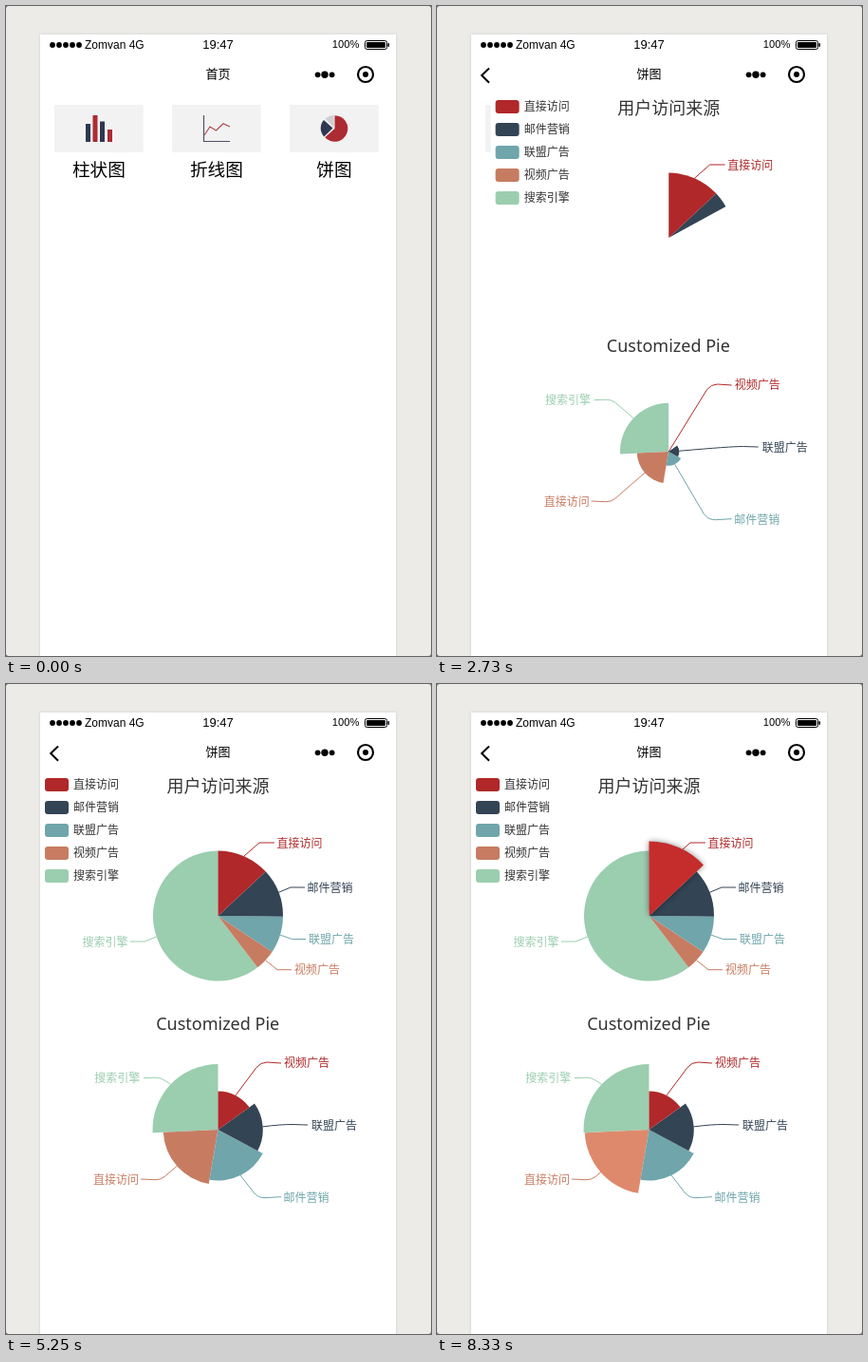
An HTML page that plays this animation: 448 by 684 pixels, repeating every 8400 ms.

```html
<!DOCTYPE html>
<html lang="zh-CN">
<head>
<meta charset="utf-8">
<title>饼图</title>
<style>
  html, body { margin: 0; width: 100%; height: 100%; overflow: hidden; background: #6c6c6a; }
  svg { display: block; width: 448px; height: 684px; }
  text { font-family: "Noto Sans CJK SC", "Noto Sans CJK JP", sans-serif; }
  .bar text { font-family: "Liberation Sans", Arial, sans-serif; }
  .mid { text-anchor: middle; }
  .end { text-anchor: end; }
  .card { font-size: 18.67px; }
  .nav { font-size: 13px; }
  .head { font-size: 18px; fill: #333; }
  .latin { font-family: "Noto Sans", sans-serif; }
  .key { font-size: 12px; fill: #333; }
  .label { font-size: 12px; font-weight: 500; }
  .line { fill: none; }
  .glow { filter: drop-shadow(0 0 3px rgba(0, 0, 0, .45)); }
</style>
</head>
<body>
<svg viewBox="0 0 448 684">
  <defs>
    <clipPath id="screen"><rect x="36" y="90" width="375" height="594"/></clipPath>
    <clipPath id="sweep"><path id="sweepPath"/></clipPath>
    <filter id="soft" x="-5%" y="-5%" width="110%" height="110%"><feGaussianBlur stdDeviation="1.6"/></filter>
  </defs>

  <rect width="448" height="684" rx="3" fill="#ecebe7"/>
  <rect x="36" y="30" width="375" height="670" fill="#c9ccd0" filter="url(#soft)"/>
  <rect x="36" y="30" width="375" height="654" fill="#fff"/>

  <g class="bar">
    <g id="signal"></g>
    <text x="83" y="44.5" font-size="12">Zomvan 4G</text>
    <text x="223.5" y="44.5" font-size="13" class="mid">19:47</text>
    <text x="343.8" y="44.3" font-size="11.2">100%</text>
    <rect x="378.5" y="36.5" width="23" height="9" rx="2" fill="none" stroke="#000"/>
    <rect x="380" y="38" width="20" height="6" rx="1"/>
    <rect x="402.5" y="39" width="1.5" height="4" rx=".7"/>
  </g>

  <text id="homeTitle" class="nav mid" x="223.5" y="76.2">首页</text>
  <g id="pieTitle">
    <text class="nav mid" x="223.5" y="76.2">饼图</text>
    <path d="M55 65.5L47.2 73L55 80.8" fill="none" stroke="#000" stroke-width="2"/>
  </g>
  <circle cx="328.6" cy="72.3" r="2.9"/>
  <circle cx="336" cy="72.3" r="3.7"/>
  <circle cx="343.6" cy="72.3" r="2.9"/>
  <circle cx="379" cy="72" r="8" fill="none" stroke="#000" stroke-width="2.2"/>
  <circle cx="379" cy="72" r="3"/>

  <g clip-path="url(#screen)">
    <g id="home"></g>
    <g id="page">
      <rect x="36" y="90" width="375" height="594" fill="#fff"/>
      <g id="charts">
        <text class="head mid" x="223.5" y="114.2">用户访问来源</text>
        <text class="head latin mid" x="223.2" y="364">Customized Pie</text>
        <g id="legend"></g>
        <g id="share" clip-path="url(#sweep)"></g>
        <g id="rose"></g>
      </g>
    </g>
  </g>
</svg>

<script>
const LOOP = 8400, STEP = 70;
const NAV = { at: 1700, ms: 470 };
const SLIDE = { at: 2510, ms: 310 };
const CHART = { at: 2672, ms: 960 };
const HOVER_MS = 300, HOVER_GROW = 10;
const COLORS = ['#b02829', '#334454', '#6fa5ab', '#c77c62', '#9bcdaf'];
const NAVY = '#2f3850', RED = '#ad2b33';

const $ = id => document.getElementById(id);
const clamp = v => Math.min(1, Math.max(0, v));
const phase = (t, s) => clamp((t - s.at) / s.ms);

function add(parent, tag, attrs, text) {
  const el = document.createElementNS(parent.namespaceURI, tag);
  for (const k in attrs) el.setAttribute(k, attrs[k]);
  if (text) el.textContent = text;
  return parent.appendChild(el);
}

// Angles are in degrees, clockwise from the top.
function polar(cx, cy, r, deg) {
  const a = deg * Math.PI / 180;
  return [cx + r * Math.sin(a), cy - r * Math.cos(a)];
}

function wedge(cx, cy, r, from, to) {
  if (r <= 0 || to <= from) return 'M0 0';
  to = Math.min(to, from + 359.99);
  const big = to - from > 180 ? 1 : 0;
  return `M${cx} ${cy}L${polar(cx, cy, r, from)}A${r} ${r} 0 ${big} 1 ${polar(cx, cy, r, to)}Z`;
}

const cubicOut = k => 1 - (1 - k) ** 3;

function elasticOut(k) {
  if (k <= 0) return 0;
  if (k >= 1) return 1;
  return 2 ** (-10 * k) * Math.sin((k - 0.1) * 2 * Math.PI / 0.4) + 1;
}

// cubic-bezier(.25, .1, .25, 1)
function ease(x) {
  let lo = 0, hi = 1;
  const at = (u, a, b) => 3 * u * (1 - u) ** 2 * a + 3 * u * u * (1 - u) * b + u ** 3;
  for (let i = 0; i < 24; i++) {
    const m = (lo + hi) / 2;
    if (at(m, 0.25, 0.25) < x) lo = m; else hi = m;
  }
  return at(lo, 0.1, 1);
}

function buildHome() {
  const home = $('home');
  ['柱状图', '折线图', '饼图'].forEach((name, i) => {
    const x = 51 + 124 * i;
    add(home, 'rect', { x, y: 104, width: 93.7, height: 50, fill: '#f2f2f2' });
    add(home, 'text', { class: 'card mid', x: x + 46.9, y: 179.3 }, name);
  });
  [[84, 124], [91.5, 115], [99, 121.5], [107, 130]].forEach(([x, y], i) =>
    add(home, 'rect', { x, y, width: 5, height: 143 - y, fill: i % 2 ? RED : NAVY }));
  add(home, 'path', { d: 'M208.5 115V142.5H236', class: 'line', stroke: '#4c5265', 'stroke-width': 1.2 });
  add(home, 'path', { d: 'M209 136L215 127L221.5 131L229 123.8L236 127', class: 'line', stroke: '#b04a50', 'stroke-width': 1.2 });
  add(home, 'path', { d: wedge(346.5, 129, 13.8, 0, 228), fill: RED });
  add(home, 'path', { d: wedge(344.5, 128.5, 12.8, 226, 312), fill: NAVY });
  add(home, 'path', { d: wedge(345.6, 127.7, 12.8, 315, 360), fill: '#cfcfd3' });
}

// Each label: name, x, y, anchor side, leader path after its first point.
function makePie(group, pie) {
  const total = pie.values.reduce((a, b) => a + b);
  let angle = 0;
  pie.items = pie.values.map((v, i) => {
    const from = angle, to = angle += v / total * 360;
    const [name, x, y, side, tail] = pie.labels[i];
    const line = add(group, 'path', { class: 'line', stroke: COLORS[i] });
    add(group, 'text', { class: 'label ' + side, x, y: y + 4.5, fill: COLORS[i] }, name);
    const r = pie.rose ? pie.r * v / Math.max(...pie.values) : pie.r;
    return { from, to, r, line, tail };
  });
  for (let i = pie.items.length - 1; i >= 0; i--)
    pie.items[i].shape = add(group, 'path', { fill: COLORS[i] });
}

function drawPie(pie, t) {
  const { cx, cy, hover } = pie;
  pie.items.forEach((s, i) => {
    let r = s.r;
    if (pie.rose) r *= elasticOut((t - CHART.at + 14 - pie.delays[i]) / 1000);
    const start = polar(cx, cy, r, (s.from + s.to) / 2);
    s.line.setAttribute('d', `M${start}${s.tail}`);
    if (i === hover.index) {
      const on = t >= hover.at;
      if (on) r += HOVER_GROW * elasticOut((t - hover.at + STEP) / HOVER_MS);
      s.shape.setAttribute('fill', on ? hover.color : COLORS[i]);
      s.shape.setAttribute('class', on && hover.glow ? 'glow' : '');
    }
    s.shape.setAttribute('d', wedge(cx, cy, r, s.from, s.to));
  });
}

const share = {
  cx: 223.5, cy: 244, r: 68.5,
  values: [335, 310, 234, 135, 1548],
  hover: { index: 0, at: 6160, color: '#c52c2c', glow: true },
  labels: [
    ['直接访问', 285.5, 167, '', 'L267 167H283'],
    ['邮件营销', 317.5, 214, '', 'L300 214H315'],
    ['联盟广告', 319, 268.5, '', 'L301.5 268.5H316'],
    ['视频广告', 304, 300.7, '', 'L286 300.7H301'],
    ['搜索引擎', 128.5, 271, 'end', 'L146 271H131']
  ]
};

const rose = {
  cx: 223.5, cy: 469, r: 69, rose: true,
  values: [235, 274, 310, 335, 400],
  delays: [110, 46, 42, 15, 0],
  hover: { index: 3, at: 7210, color: '#de896b' },
  labels: [
    ['视频广告', 293, 398.7, '', 'L264 403.5Q268.5 398 275 398L290 399'],
    ['联盟广告', 322, 464, '', 'Q290 463.4 302 463.5L318 464'],
    ['邮件营销', 292.5, 540, '', 'L261 535Q266 541 273 540.7L290 539.7'],
    ['直接访问', 140, 521, 'end', 'L167 518.5Q162.5 522 157 521.7L142 521'],
    ['搜索引擎', 141.3, 414.7, 'end', 'L167 417Q163 414.3 158 414.2L145 414.6']
  ]
};

function build() {
  for (let i = 0; i < 5; i++) add($('signal'), 'circle', { cx: 49 + 7 * i, cy: 41, r: 2.9 });
  buildHome();
  ['直接访问', '邮件营销', '联盟广告', '视频广告', '搜索引擎'].forEach((name, i) => {
    const y = 99 + 24 * i;
    add($('legend'), 'rect', { x: 41, y, width: 25, height: 14, rx: 3, fill: COLORS[i] });
    add($('legend'), 'text', { class: 'key', x: 71, y: y + 11.3 }, name);
  });
  makePie($('share'), share);
  makePie($('rose'), rose);
}

function draw(t) {
  const nav = phase(t, NAV);
  $('homeTitle').setAttribute('opacity', 1 - nav);
  $('pieTitle').setAttribute('opacity', nav);

  const slide = ease(phase(t, SLIDE));
  $('page').setAttribute('transform', `translate(${375 * (1 - slide)} 0)`);

  $('charts').setAttribute('visibility', t >= CHART.at ? 'visible' : 'hidden');
  const angle = 360 * cubicOut(phase(t, CHART));
  $('sweepPath').setAttribute('d', wedge(share.cx, share.cy, 400, 0, angle));
  drawPie(share, t);
  drawPie(rose, t);
}

build();
const began = performance.now();
function tick() {
  const t = (performance.now() - began) % LOOP;
  draw(Math.floor(t / STEP) * STEP);
  requestAnimationFrame(tick);
}
tick();
</script>
</body>
</html>
```
